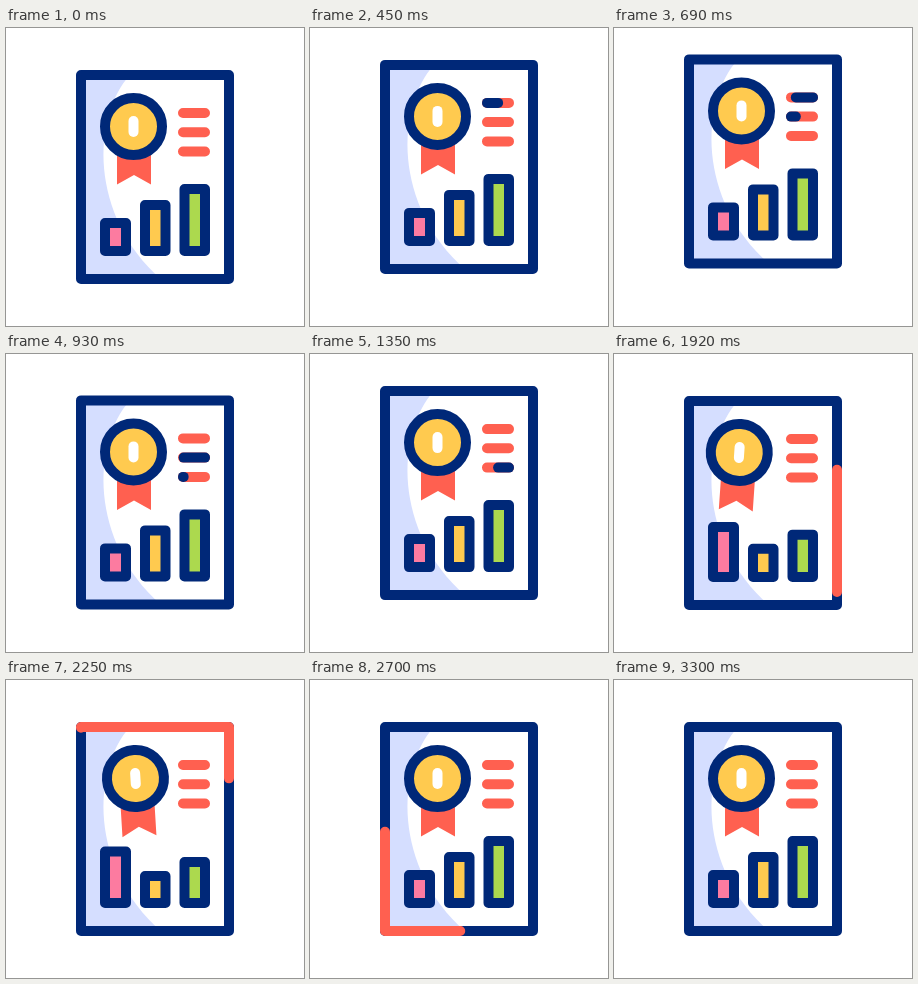
Animation of 298x298 px, one loop 3.6 s. Source, as an HTML page:

```html
<!DOCTYPE html>
<html lang="en">
<head>
<meta charset="utf-8">
<title>Award report</title>
<style>
  html, body { margin: 0; width: 100%; height: 100%; overflow: hidden; background: #fff; }
  svg { display: block; width: 100%; height: 100%; }
  .line { fill: none; stroke-width: 10; stroke-linecap: round; stroke-linejoin: round; }
  .navy { stroke: #002878; }
  .red { stroke: #ff6050; }
</style>
</head>
<body>
<svg viewBox="0 0 298 298">
  <g id="card">
    <path fill="#fff" d="M75 47H223V251H75z"/>
    <path fill="#d5deff" d="M75 47H124C86 88 83 188 155 251H75z"/>
    <path class="line navy" d="M75 47H223V251H75z"/>
    <g id="medal">
      <path fill="#ff6050" d="M111 115H145V156.5L128 147L111 156.5z"/>
      <circle class="line navy" cx="127.5" cy="98.5" r="28.5" style="fill:#ffca4f"/>
      <path class="line" stroke="#fff" d="M127.5 93V104"/>
    </g>
    <path class="line red" d="M177 85H199M177 104.2H199M177 123.5H199"/>
    <path class="line navy sweep" d="M177 85H199"/>
    <path class="line navy sweep" d="M177 104.2H199"/>
    <path class="line navy sweep" d="M177 123.5H199"/>
    <path class="line navy bar" style="fill:#fc7ba0"/>
    <path class="line navy bar" style="fill:#ffca4f"/>
    <path class="line navy bar" style="fill:#acd94e"/>
  </g>
  <path class="line red" id="border" d="M223 251V47H75V251H223"/>
</svg>
<script>
const LOOP = 3600;
const card = document.getElementById('card');
const medal = document.getElementById('medal');
const border = document.getElementById('border');
const sweeps = document.querySelectorAll('.sweep');
const bars = document.querySelectorAll('.bar');

// left, right, resting top, raised or lowered top
const barSpecs = [[99, 120, 195, 167], [139, 159.5, 177, 199.5], [178.5, 199, 161, 186]];

function ease(t, start, end) {
  const u = Math.min(1, Math.max(0, (t - start) / (end - start)));
  return u * u * (3 - 2 * u);
}

// Values are added up from eased steps: [start, end, change]
const track = (t, ...steps) => steps.reduce((sum, [a, b, d]) => sum + d * ease(t, a, b), 0);

function trim(path, from, to) {
  const length = path.getTotalLength();
  path.style.display = to - from > 1e-4 ? '' : 'none';
  path.setAttribute('stroke-dasharray', `${(to - from) * length} ${length * 3}`);
  path.setAttribute('stroke-dashoffset', -from * length);
}

function draw(t) {
  const lift = track(t, [300, 600, -20], [600, 900, 20], [900, 1200, -20], [1200, 1500, 20]);
  card.setAttribute('transform', `translate(0 ${lift})`);

  const tilt = track(t, [1500, 1800, 5], [1800, 2400, -10], [2400, 2700, 5]);
  medal.setAttribute('transform', `rotate(${tilt} 127.5 66)`);

  sweeps.forEach((path, i) => {
    const start = 300 + i * 300;
    trim(path, ease(t, start + 300, start + 600), ease(t, start, start + 300));
  });

  const swap = track(t, [1500, 2100, 1], [2100, 2700, -1]);
  bars.forEach((bar, i) => {
    const [left, right, rest, moved] = barSpecs[i];
    bar.setAttribute('d', `M${left} ${rest + (moved - rest) * swap}H${right}V223H${left}z`);
  });

  trim(border, ease(t, 1800, 3300), ease(t, 1500, 3000));
}

const begin = performance.now();
function tick() {
  draw((performance.now() - begin) % LOOP);
  requestAnimationFrame(tick);
}
tick();
</script>
</body>
</html>
```
